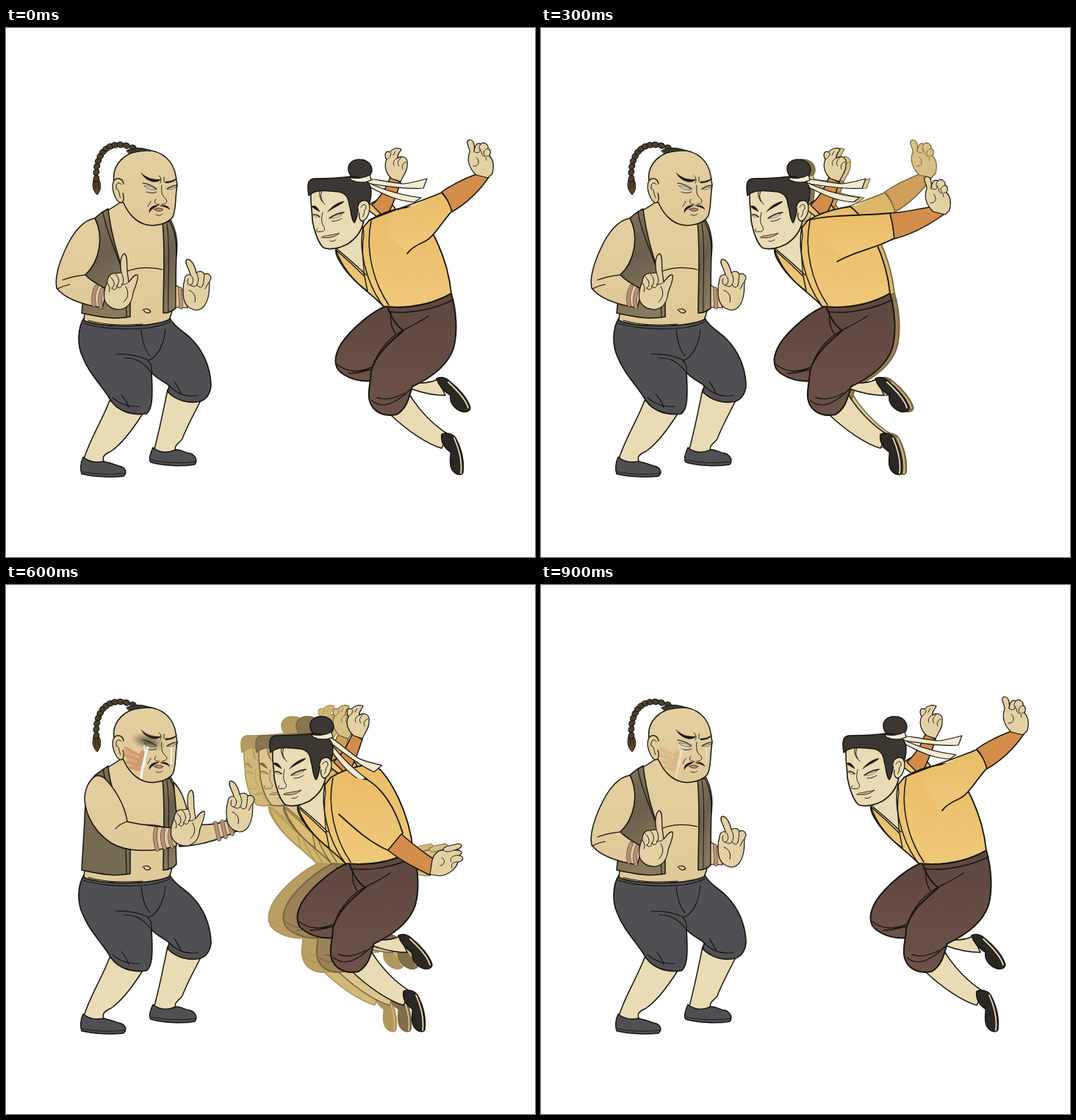
Write an HTML page that moves like this. It is 720 px wide and 720 px high and loops after 1 s.

```html
<!DOCTYPE html>
<html lang="en">
<head>
<meta charset="utf-8">
<title>Slap duel</title>
<style>
html,body{margin:0;width:100%;height:100%;overflow:hidden;background:#fff}
svg{display:block;width:100%;height:100%}
path,ellipse{stroke-linecap:round;stroke-linejoin:round}
</style>
</head>
<body>
<svg viewBox="0 0 720 720">
<defs>
<linearGradient id="vest" x1="0" y1="0" x2=".3" y2="1"><stop offset="0" stop-color="#85765c"/><stop offset=".5" stop-color="#6b5f4d"/><stop offset="1" stop-color="#89795d"/></linearGradient>
<linearGradient id="shirt" x1="0" y1="0" x2="0" y2="1"><stop offset="0" stop-color="#eabd67"/><stop offset="1" stop-color="#eec87a"/></linearGradient>
<linearGradient id="skin" x1="0" y1="0" x2="0" y2="1"><stop offset="0" stop-color="#e2cf9f"/><stop offset="1" stop-color="#dfc999"/></linearGradient>
<linearGradient id="brown" x1="0" y1="0" x2="0" y2="1"><stop offset="0" stop-color="#5e4740"/><stop offset="1" stop-color="#6c5248"/></linearGradient>
<radialGradient id="bruise"><stop offset="0" stop-color="#2b211c"/><stop offset=".45" stop-color="#4a3c32" stop-opacity=".7"/><stop offset="1" stop-color="#8a765c" stop-opacity="0"/></radialGradient>
<g id="tints"></g>
</defs>
<g id="stage"></g>
</svg>
<script>
const INK = '#19150f', SKIN = 'url(#skin)', PALE = '#e9dcb4', PALM = '#e3d1a4', VEST = 'url(#vest)',
  SLATE = '#505054', SHIRT = 'url(#shirt)', ORANGE = '#d28d4b', BROWN = 'url(#brown)', HAIR = '#3c3732';

const fill = (d, f, w = 1.5) => `<path d="${d}" fill="${f}" stroke="${w ? INK : 'none'}" stroke-width="${w}"/>`;
const line = (d, w = 1.2, c = INK) => `<path d="${d}" fill="none" stroke="${c}" stroke-width="${w}"/>`;
const move = (x, y, s) => `<g transform="translate(${x} ${y})">${s}</g>`;
const turn = (a, x, y, s) => `<g transform="rotate(${a} ${x} ${y})">${s}</g>`;

// Tinted trails: one filter per strength
const tint = (id, k) => {
  const row = (i, c) => [0, 1, 2, 3].map(j => i === j ? 1 - k : 0).join(' ') + ' ' + k * c;
  return `<filter id="${id}" color-interpolation-filters="sRGB" x="-10%" y="-10%" width="120%" height="120%">
  <feColorMatrix values="${row(0, .8)} ${row(1, .69)} ${row(2, .42)} 0 0 0 1 0"/></filter>`;
};
document.getElementById('tints').innerHTML = tint('near', .52) + tint('far', .82);

/* ---------- bald fighter ---------- */

function braid() {
  const beads = 12;
  let s = fill('M119 207L127 207C130 214 129 222 124 227C118 221 117 214 119 207Z', '#5a4527', 1)
    + line('M122 208L122 219M125 209L126 218', .8);
  for (let i = 0; i < beads; i++) {
    const u = i / (beads - 1), v = 1 - u;
    const at = (a, b, c, d) => v * v * v * a + 3 * v * v * u * b + 3 * v * u * u * c + u * u * u * d;
    const x = at(123, 121, 138, 173).toFixed(1), y = at(205, 172, 149, 163).toFixed(1);
    s += `<ellipse cx="${x}" cy="${y}" rx="4.6" ry="3.6" transform="rotate(${-70 + 105 * u} ${x} ${y})" fill="#4a4131" stroke="${INK}" stroke-width="1.2"/>`;
  }
  return s;
}

const foeLegs =
  fill('M141 507C132 532 113 562 106 587C115 595 128 594 133 589C130 583 136 579 143 576C158 566 172 547 186 525Z', PALE)
  + fill('M220 492C214 522 208 550 202 573C211 580 226 579 231 575C228 567 237 565 240 559C247 541 255 527 264 509Z', PALE)
  + fill('M105 584C101 592 101 602 103 607C120 611 146 612 160 610C165 605 163 600 157 597C147 594 139 591 133 590C122 592 112 590 105 584Z', SLATE)
  + fill('M200 571C196 580 194 588 197 591C214 596 240 597 257 594C261 588 258 582 251 579C242 578 238 573 231 574C218 580 207 577 200 571Z', SLATE)
  + line('M104 604C124 608 145 608 162 606M198 588C216 592 240 593 258 590', .9)
  + fill('M106 395C97 409 97 432 104 447C113 471 132 488 142 506C151 520 169 528 191 525C199 520 200 503 198 469C208 480 222 484 222 488L220 495C231 507 249 512 265 508C274 505 279 495 279 485C278 461 268 438 250 421C240 412 227 405 222 393Z', SLATE, 1.7)
  + line('M105 402C130 410 170 411 195 408C207 406 217 403 223 400')
  + line('M217 410C215 430 207 448 193 453M184 411C186 430 190 440 196 446M194 452C181 446 165 443 150 444M198 469C199 460 197 456 193 453M198 469C183 450 172 449 160 449M145 503C157 514 171 516 182 515M157 499C164 508 166 512 167 517M222 487C234 499 248 503 262 500M229 481C234 489 236 492 238 497');

const foeTorso =
  fill('M157 236C145 246 128 253 121 259L106 398C126 407 193 409 222 397C232 375 229 340 231 315C235 295 232 275 224 261Z', SKIN)
  + line('M163 332C178 325 200 325 213 329M112 398C132 404 160 405 186 403')
  + line('M174 258C183 266 198 270 211 266M186 384C190 381 195 382 197 386C194 389 189 388 188 385')
  + fill('M213 265C217 300 214 345 214 388C222 388 229 384 232 380C230 340 232 320 232 297C231 284 228 272 223 263Z', VEST)
  + line('M219 266C224 300 220 345 221 386', 1);

const vestLeft =
  fill('M121 259C131 277 130 315 108 335L103 388C130 394 150 397 169 393L169 362C164 338 145 300 139 246C133 249 126 254 121 259Z', VEST)
  + line('M132 250C137 286 160 320 163 355L164 393');

const vestTurned =
  fill('M120 260C112 270 107 295 107 320L103 388C130 394 150 397 169 393L169 352C164 325 142 285 139 246Z', '#776a52')
  + line('M132 250C137 286 160 320 163 355L164 393');

const nearHand =
  fill('M134 370C132 358 136 350 138 345C138 338 143 333 149 334L157 333C155 321 155 311 161 307C166 309 164 322 165 331L167 346C171 341 175 335 179 336C181 341 176 352 173 360C172 371 167 381 156 383C145 384 137 378 134 370Z', PALM, 1.2)
  + line('M157 333C160 340 161 345 158 349M149 335C154 339 155 347 151 351M142 339C148 344 149 351 144 354M138 347C141 351 142 356 140 359M158 349C164 349 166 347 167 345M151 351C153 356 158 353 158 349M144 354C147 358 151 356 151 351M163 352C168 360 166 368 160 373', 1);

const farHand =
  fill('M242 369C240 356 241 349 243 343C243 337 247 335 251 336C249 327 242 319 246 315C252 314 257 323 259 333C263 330 268 331 270 335C275 333 279 336 279 341C275 346 278 352 276 362C274 375 268 384 259 384C250 383 244 377 242 369Z', PALM, 1.2)
  + line('M251 336C256 340 256 348 251 350C247 350 246 345 248 341M259 333C262 338 263 345 260 349M270 335C269 340 270 344 268 350M276 346C273 350 273 353 271 355M251 350C255 353 259 352 260 349C262 354 267 354 268 350M249 357C256 359 259 366 257 373', 1);

const bands = list => list.map(d => line(d, 5.6, '#4a3828') + line(d, 4.4, '#b5917a')).join('');

const foeArms = [
  vestLeft
    + fill('M231 350L243 358L247 381L231 380Z', SKIN, 1.2) + bands(['M237 355L238 380'])
    + fill('M121 259C101 262 88 285 80 303C72 321 66 340 69 354C79 367 96 373 112 377L131 381L138 356C128 351 116 345 108 336C127 318 134 285 121 259Z', SKIN)
    + line('M77 343C89 338 99 337 108 336M70 355C78 351 82 350 87 349')
    + bands(['M123 352C119 360 118 368 120 377', 'M131 356C128 363 127 371 129 380'])
    + nearHand + farHand,
  vestTurned
    + fill('M228 268C240 281 243 294 246 304L264 326C280 327 292 325 306 318L316 334C294 345 265 355 236 356Z', SKIN)
    + bands(['M285 324L290 346', 'M294 322L299 343', 'M302 319L308 339'])
    + fill('M122 260C112 266 107 279 107 293C109 316 123 338 143 351C163 364 200 364 232 355L230 331C207 329 185 327 165 322C162 300 148 276 133 262C129 260 125 259 122 260Z', SKIN)
    + line('M165 322C158 324 153 327 149 332')
    + bands(['M204 332C202 342 203 352 206 360', 'M214 333C212 342 213 351 216 358', 'M224 334C222 342 223 349 226 356'])
    + move(91, -28, nearHand) + move(59, -48, farHand),
  vestTurned
    + fill('M108 292C120 300 130 306 129 308C128 322 119 331 107 334Z', SKIN, 1.2)
    + fill('M226 264C245 262 260 267 270 276L300 292C315 293 328 291 342 286L352 300C325 316 292 325 264 321Z', SKIN)
    + bands(['M318 292L324 314', 'M327 290L333 310', 'M335 288L342 305'])
    + fill('M141 260C122 256 108 266 107 285C110 304 136 316 160 323C190 329 230 329 264 318L260 293C235 291 210 292 190 293C180 280 165 267 141 260Z', SKIN)
    + line('M190 293C185 294 183 300 184 305')
    + bands(['M238 293C236 304 237 315 240 323', 'M248 293C246 304 247 313 250 321', 'M257 294C255 303 256 311 259 318'])
    + move(119, -65, nearHand) + move(97, -80, farHand)
];

const foeHead =
  fill('M147 208C144 187 160 168 190 166C214 167 228 182 231 201L233 214C230 230 232 246 227 257C220 267 203 270 192 268C177 265 166 252 160 238C152 234 147 222 147 208Z', SKIN)
  + fill('M164 167C174 161 187 163 198 167C188 167 178 168 168 171Z', HAIR, 1)
  + fill('M160 212C158 203 149 203 146 210C143 219 149 236 156 238C161 237 161 230 159 225', SKIN, 1.3)
  + line('M157 213C153 208 149 212 150 219C155 219 153 227 156 231', 1)
  + fill('M184 197C191 204 200 207 211 206C207 210 203 210 199 209C192 207 187 203 184 197Z', INK, .3)
  + fill('M217 209C223 209 229 207 233 204C230 209 224 211 217 211Z', INK, .3)
  + fill('M188 215C194 214 200 217 204 220C198 221 192 219 188 215Z', '#cfd0c4', .5)
  + fill('M220 219C224 217 229 216 232 216C230 219 225 221 220 219Z', '#cfd0c4', .5)
  + line('M186 211C193 212 200 215 205 219M219 219C223 216 228 214 233 214', 1.2)
  + line('M208 201C211 203 212 207 210 211M215 203L215 209M212 214C211 222 212 229 217 232C221 236 218 240 212 240M204 233C200 237 204 241 209 240M191 223C196 225 201 225 205 223M197 236C196 239 194 240 193 243', .9)
  + fill('M195 251C194 245 200 241 208 241C204 244 199 245 195 251ZM210 242C216 240 221 242 223 247C219 244 214 243 210 242Z', INK, .4)
  + fill('M202 247C206 244 211 245 214 247C211 250 206 250 202 247Z', '#c98e72', .8)
  + line('M204 254C208 256 211 255 213 253', .8);

const marks = (bruise, red, tears) =>
  `<g opacity="${bruise}"><ellipse cx="193" cy="213" rx="25" ry="12" transform="rotate(14 193 213)" fill="url(#bruise)"/></g>`
  + `<g opacity="${red * .5}">` + line('M166 228L180 247', 13, '#d58a63')
  + line('M163 222L184 233M162 231L184 239M164 241L182 246M168 248L181 251', 4, '#c26a4c')
  + line('M182 243L186 228', 7, '#c26a4c') + '</g>'
  + `<g opacity="${tears * .85}">`
  + line('M193 221C188 236 185 248 184 263', 3, '#fff') + line('M188 219C191 230 190 238 188 247', 2, '#fff')
  + line('M225 221C226 230 224 236 225 243', 2, '#fff') + '</g>';

const foe = s => foeLegs + foeTorso + foeArms[s.push] + braid() + foeHead + marks(s.bruise, s.red, s.tears);

/* ---------- leaping fighter ---------- */

const heroLegs =
  fill('M555 483C570 484 580 482 588 478L598 500C582 500 565 496 551 491Z', PALE)
  + fill('M524 527C544 546 572 566 593 572L602 553C582 541 562 520 550 500Z', PALE)
  + fill('M586 477C592 474 598 476 603 480C616 490 629 505 632 517C631 524 622 524 614 519C606 513 604 506 605 500C597 495 589 488 586 477Z', '#2b2724')
  + fill('M593 553C600 550 608 552 612 558C620 572 624 590 622 605C619 610 612 608 607 601C602 591 606 584 605 577C597 572 591 563 593 553Z', '#2b2724')
  + line('M602 482C614 493 626 506 629 517M610 558C617 574 621 592 619 606', 1.8, '#e6d9b5')
  + fill('M519 378C499 385 470 409 456 430C446 447 446 461 456 469C468 478 484 482 497 480L545 430L560 380Z', BROWN, 2)
  + fill('M519 378C550 384 585 374 606 361C613 385 615 414 609 436C602 457 581 475 553 488C548 504 546 517 532 526C514 530 499 522 495 508C491 496 497 482 497 467C504 440 532 420 541 412C530 404 523 391 519 378Z', BROWN, 2)
  + line('M521 386C550 390 585 382 609 370M524 388C522 402 526 410 530 416M575 392C561 402 548 407 536 414C517 425 503 445 497 467M451 458C464 469 482 469 497 462M466 470C478 470 488 467 496 465M498 507C510 518 528 514 551 491M505 503C517 507 530 504 542 497', 1.4);

const heroTorso =
  fill('M488 244L516 228L530 246L512 262Z', SHIRT)
  + fill('M523 203C517 220 508 232 498 241L516 259C526 244 532 226 537 210Z', ORANGE)
  + fill('M525 205C517 198 514 188 518 179C514 172 517 166 522 169C526 164 533 162 538 165C536 170 532 171 533 177C541 172 548 178 546 186C547 194 541 200 537 209Z', PALM, 1.2)
  + line('M518 179C521 177 524 175 524 170M533 177C528 179 526 183 528 187M538 176C533 181 532 185 535 188M545 182C540 184 538 187 540 192M530 168L527 173', .9)
  + fill('M494 262C510 252 530 246 552 243C577 262 601 312 606 361C580 376 548 382 514 379C498 362 472 346 457 322C451 313 448 307 449 302L463 297L486 272Z', SHIRT, 1.8)
  + fill('M449 302L486 270L487 282C484 300 486 315 488 343C472 328 458 315 449 302Z', PALE, 1.2)
  + fill('M449 302C456 308 468 318 488 338L492 358C474 345 458 327 449 302Z', SHIRT, 1.4)
  + line('M452 302C466 314 478 324 490 336M486 272C480 300 489 345 513 378M497 263C489 300 499 345 521 377', 1.5);

const ribbon =
  fill('M488 205C508 206 525 211 541 212C552 211 562 208 573 205L568 218C548 220 520 216 490 211Z', '#f2ead3', 1.2)
  + fill('M488 208C506 217 530 227 565 231L556 237C530 236 508 223 488 213Z', '#f2ead3', 1.2);

const heroHead = sway => turn(sway, 490, 207, ribbon)
  + fill('M415 220C414 240 417 250 417 262C420 278 424 291 432 299C442 303 456 299 465 294C477 286 485 274 487 262L492 240L470 215Z', PALE, 1.6)
  + fill('M466 193C465 184 473 178 482 179C492 179 498 186 498 194C496 203 490 206 482 206C473 206 467 201 466 193Z', HAIR)
  + fill('M412 228C410 215 410 206 419 205C436 205 456 204 470 202C485 202 497 210 497 222C497 233 495 240 491 244L481 238C479 250 478 260 474 265C469 259 470 248 467 240C466 230 462 225 453 223C438 221 425 220 418 224Z', HAIR)
  + fill('M468 203C476 206 488 204 495 200L497 207C489 211 478 211 470 207Z', '#f2ead3', 1.2)
  + fill('M479 243C480 234 491 232 494 239C497 248 492 261 485 263C481 262 480 256 481 252', PALE, 1.3)
  + line('M483 244C486 238 491 239 490 246C486 248 489 254 485 257M430 222C427 228 429 235 434 240M427 222C426 229 428 232 430 236', 1)
  + fill('M416 243C420 240 424 244 427 250C424 248 419 246 416 243ZM438 250C443 243 452 237 460 236C457 240 448 243 438 250Z', INK, .6)
  + fill('M419 255C421 254 424 255 426 257C424 258 421 258 419 255ZM442 259C447 256 452 254 458 253C454 257 448 260 442 259Z', '#dcd8c4', .4)
  + line('M418 254C421 253 424 254 427 257M440 259C446 254 452 252 460 251', 1.3)
  + line('M431 251C429 259 429 266 433 271C435 276 431 278 427 277M424 273C421 276 423 279 427 277M444 263C449 263 453 262 457 259M441 290C444 291 447 290 449 288', .9)
  + fill('M430 285C434 282 437 283 440 282C444 281 449 281 454 279C449 284 440 287 430 285Z', '#d9a98c', .8);

const claw =
  fill('M640 200C630 191 627 179 631 169C632 163 624 156 630 152C638 152 638 162 637 168C638 160 641 155 646 158C651 154 657 159 656 164C660 165 660 170 658 174C664 180 664 190 662 198L656 204Z', PALM, 1.2)
  + line('M637 168C641 171 646 170 646 165M646 158C643 162 643 167 648 169M656 164C651 165 648 170 652 174M658 174C654 173 652 176 654 180M640 176C646 181 643 189 636 188M647 170C648 175 652 176 652 174', .9);

const slapArm =
  fill('M500 262L429 268C426 278 424 290 424 299C445 311 470 317 498 319C518 318 530 300 525 275Z', SHIRT, 0)
  + line('M518 260C490 266 455 268 429 268C426 278 424 290 424 299C445 311 470 317 498 319', 1.8)
  + fill('M429 268C407 264 384 255 362 249L356 262C377 277 402 290 424 299Z', ORANGE)
  + fill('M362 250C359 240 351 229 345 219C342 213 347 212 350 218C354 225 357 230 359 238L362 249L357 262C342 261 327 254 311 247C307 243 312 241 317 243L327 246C319 241 311 236 307 231C308 227 314 230 319 233L330 239C322 232 313 223 311 217C315 213 321 222 327 227L340 235C338 228 339 224 345 220Z', PALM, 1.2)
  + line('M327 246L338 250M330 239L341 244M340 235C343 239 346 241 349 242', .9);

// Near arm by pose name
const heroArms = {
  high: fill('M525 254L593 224C600 232 605 241 607 249C590 267 580 287 566 294L545 305L520 280Z', SHIRT, 0)
    + line('M494 262C520 250 560 238 593 224C600 232 605 241 607 249C592 266 582 285 569 291C560 295 550 301 546 307', 1.8)
    + fill('M593 223C609 212 624 205 640 199L657 203C646 220 626 240 607 250C604 239 599 230 593 223Z', ORANGE) + claw,
  side: fill('M525 256L606 252C609 262 611 275 612 286C595 297 570 304 545 312L515 290Z', SHIRT, 0)
    + line('M494 262C520 254 565 256 606 252C609 262 611 275 612 286C590 299 560 303 534 318', 1.8)
    + fill('M606 252C625 251 645 246 665 243L679 254C658 269 635 281 612 287C611 274 609 263 606 252Z', ORANGE) + move(25, 50, claw),
  low: fill('M530 262C556 270 578 297 594 336L572 361C548 351 528 333 512 320Z', SHIRT, 0)
    + line('M540 263C564 275 582 304 592 338L572 361C548 351 528 333 505 312', 1.8)
    + fill('M590 339C605 352 620 364 634 373L629 395C609 385 589 375 572 361Z', ORANGE)
    + fill('M632 375C634 366 641 360 647 361C646 355 658 355 668 352C677 354 670 359 662 361C671 360 676 364 669 368C677 370 674 376 667 377C665 386 655 394 643 396L629 394Z', PALM, 1.2)
    + line('M647 361C652 365 657 362 662 361M669 368C660 367 655 372 658 377M667 377C660 376 657 381 659 385M645 371C651 374 649 381 643 382', .9),
  swing: turn(-62, 500, 290, slapArm),
  slap: slapArm
};

const hero = (dx, arm, sway) => move(dx, 0, heroLegs + heroTorso + heroHead(sway) + heroArms[arm]);

/* ---------- timeline ---------- */

// start time, hero shift, arm, ribbon sway, trails [shift, arm], foe state
const step = (t, dx, arm, sway, trails = [], push = 0, bruise = 0, red = 0, tears = 0) =>
  ({ t, dx, arm, sway, trails, push, bruise, red, tears });

const steps = [
  step(0, 0, 'high', 0),
  step(100, -46, 'high', 0, [[-8, 'high'], [-24, 'high']]),
  step(200, -94, 'high', 0, [[-46, 'high'], [-75, 'high']]),
  step(300, -131, 'side', 0, [[-125, 'high']]),
  step(350, -142, 'low', 12, [[-136, 'side']]),
  step(400, -151, 'swing', 24),
  step(450, -157, 'slap', 30, [], 0, .9),
  step(500, -124, 'swing', 30, [[-148, 'swing'], [-138, 'swing']], 0, .8, 1, .4),
  step(600, -52, 'low', 29, [[-91, 'low'], [-71, 'low']], 1, .65, 1, 1),
  step(700, -27, 'side', 27, [[-39, 'high'], [-33, 'high']], 2, .65, 1, 1),
  step(800, -9, 'high', 10, [[-19, 'high'], [-14, 'high']], 1, .4, .7, .8),
  step(900, 0, 'high', 0, [], 0, 0, .35, .4)
];

const stage = document.getElementById('stage');
let shown = null;

function draw(ms) {
  const s = steps.filter(x => x.t <= ms).pop();
  if (s === shown) return;
  shown = s;
  const last = s.trails.length - 1;
  const trails = s.trails.map(([dx, arm], i) =>
    `<g filter="url(#${i < last ? 'far' : 'near'})">${hero(dx, arm, s.sway)}</g>`).join('');
  stage.innerHTML = trails + foe(s) + hero(s.dx, s.arm, s.sway);
}

const start = performance.now();
function tick() {
  draw((performance.now() - start) % 1000);
  requestAnimationFrame(tick);
}
draw(0);
requestAnimationFrame(tick);
</script>
</body>
</html>
```
